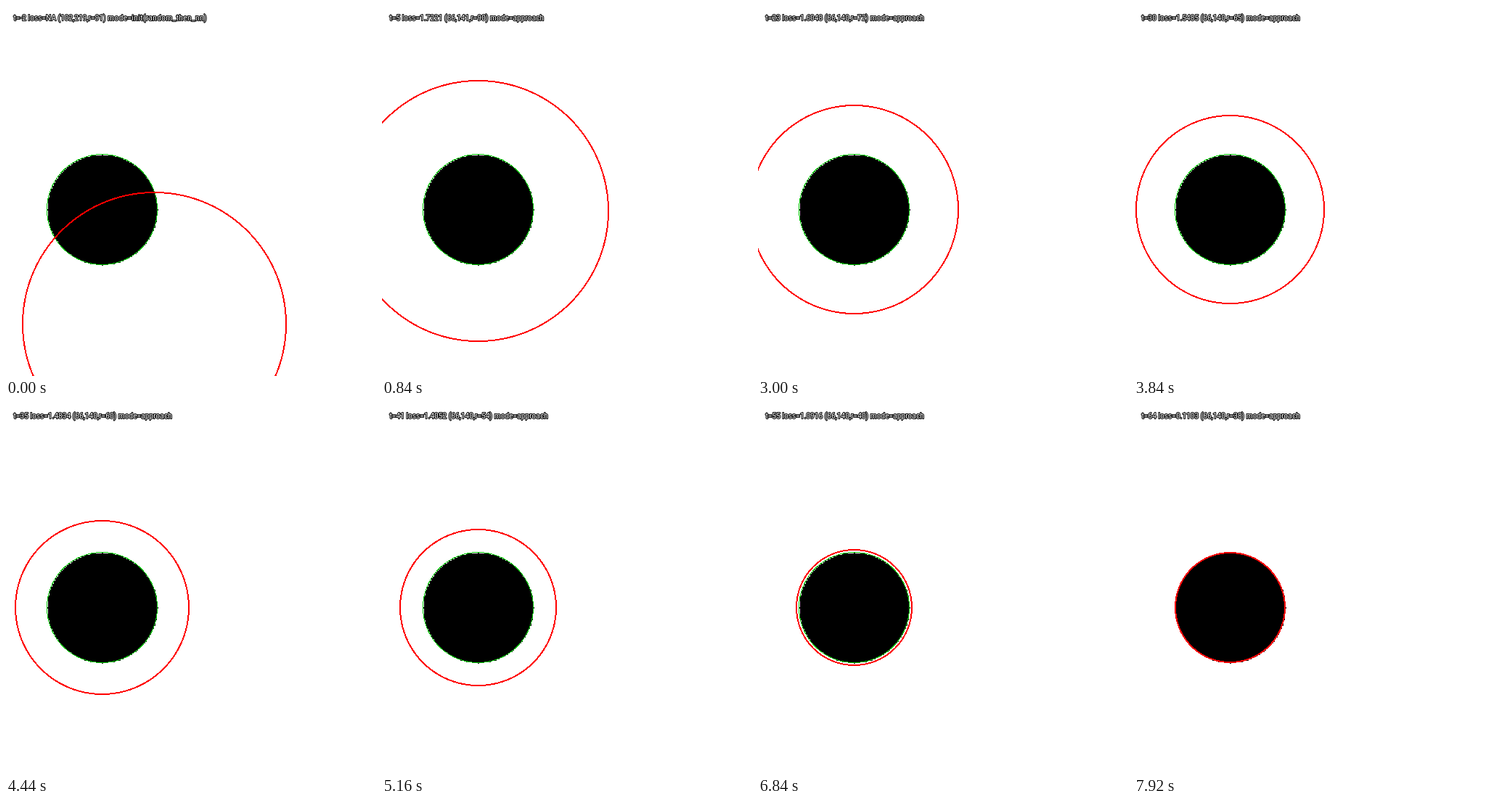
An HTML page with a canvas for the animation above (8 s loop, 510 by 510 pixels).

```html
<!DOCTYPE html>
<html lang="en">
<head>
<meta charset="utf-8">
<title>Circle fitting</title>
<style>
  html, body { margin: 0; width: 100%; height: 100%; overflow: hidden; background: #fff; }
  canvas { display: block; width: 510px; height: 510px; }
</style>
</head>
<body>
<canvas id="stage" width="510" height="510"></canvas>
<script>
const ctx = document.getElementById('stage').getContext('2d');
const SIZE = 510, SCALE = 2, STEP_MS = 120, LOOP_MS = 8000, FIRST_STEP = -2;
const goal = { x: 66, y: 140, r: 38 };

// [step, x, y, radius]
const path = [
  [-2, 102, 219, 91], [5, 66, 141, 90], [12, 66, 138, 82],
  [15, 66, 140, 80], [57, 66, 140, 38]
];
// [step, loss]
const losses = [
  [-2, 1.95], [5, 1.7221], [15, 1.6692], [30, 1.5485],
  [41, 1.4052], [49, 1.2813], [56, 1.06], [57, 0.1103]
];

function sample(keys, t, col) {
  const i = keys.findIndex(k => k[0] >= t);
  if (i < 0) return keys[keys.length - 1][col];
  if (i === 0) return keys[0][col];
  const a = keys[i - 1], b = keys[i];
  return a[col] + (b[col] - a[col]) * (t - a[0]) / (b[0] - a[0]);
}

const halfSpan = (r, dy) => Math.abs(dy) > r ? -1 : Math.floor(Math.sqrt(r * r - dy * dy));

// Solid disc made of SCALE-sized cells
function disc({ x, y, r }) {
  ctx.fillStyle = '#000';
  for (let dy = -r; dy <= r; dy++) {
    const w = halfSpan(r, dy);
    ctx.fillRect((x - w) * SCALE, (y + dy) * SCALE, (2 * w + 1) * SCALE, SCALE);
  }
}

// Hard-edged ring, drawn row by row without antialiasing
function ring({ x, y, r }, width, color) {
  const cx = x * SCALE, cy = y * SCALE, outer = r * SCALE + 0.5;
  ctx.fillStyle = color;
  for (let dy = -r * SCALE; dy <= r * SCALE; dy++) {
    const out = halfSpan(outer, dy), inn = halfSpan(outer - width, dy);
    if (inn < 0) {
      ctx.fillRect(cx - out, cy + dy, 2 * out + 1, 1);
    } else {
      ctx.fillRect(cx - out, cy + dy, out - inn, 1);
      ctx.fillRect(cx + inn + 1, cy + dy, out - inn, 1);
    }
  }
}

function outlined(text, x, spacing) {
  ctx.letterSpacing = spacing + 'px';
  ctx.strokeText(text, x, 20);
  ctx.fillText(text, x, 20);
  return x + ctx.measureText(text).width;
}

function label(t, c) {
  const init = t < 0;
  const loss = init ? 'NA' : sample(losses, t, 1).toFixed(4);
  ctx.font = '10px Roboto, sans-serif';
  ctx.lineWidth = 2;
  ctx.lineJoin = 'round';
  ctx.strokeStyle = '#000';
  ctx.fillStyle = '#fff';
  const end = outlined(`t=${t} loss=${loss} (${c.x},${c.y},r=${c.r}) `, 10.5, 0.1);
  outlined('mode=' + (init ? 'init(random_then_nn)' : 'approach'), end, init ? 0.45 : 0.1);
}

function draw(t) {
  const [x, y, r] = [1, 2, 3].map(col => Math.round(sample(path, t, col)));
  const guess = { x, y, r };
  ctx.fillStyle = '#fff';
  ctx.fillRect(0, 0, SIZE, SIZE);
  disc(goal);
  ring(goal, 1, '#00c800');
  ring(guess, 2, '#f00');
  label(t, guess);
}

const start = performance.now();
function tick() {
  const ms = (performance.now() - start) % LOOP_MS;
  draw(FIRST_STEP + Math.floor(ms / STEP_MS));
  requestAnimationFrame(tick);
}
tick();
</script>
</body>
</html>
```
